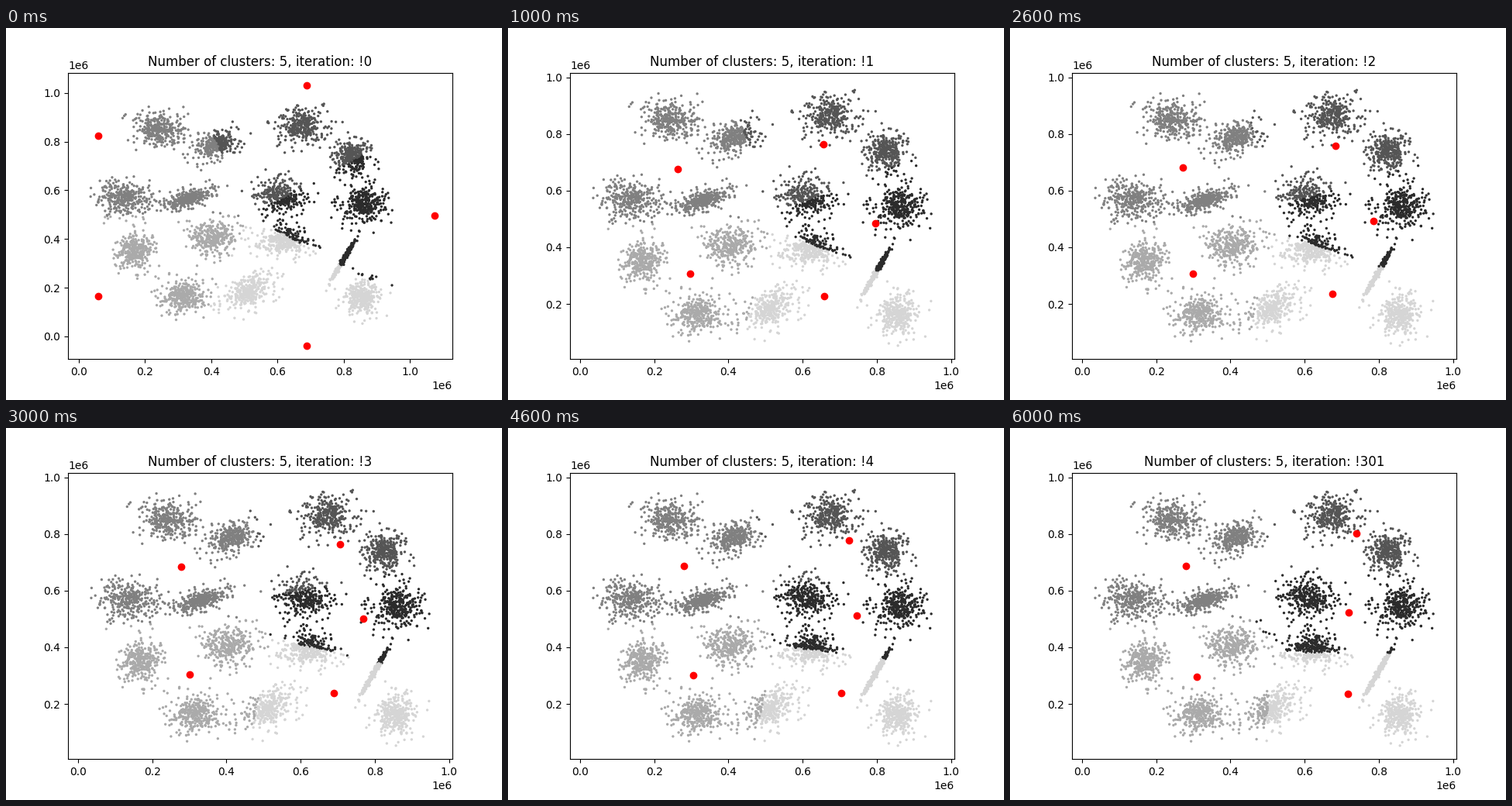
A matplotlib script for the animation above (7 s loop, 640x480 px).

```python
import numpy as np
import matplotlib.pyplot as plt
from matplotlib.animation import FuncAnimation

K = 5
rng = np.random.default_rng(4)

# Data range, and the ring of starting centres
X_RANGE = (19835.0, 961951.0)
Y_RANGE = (51121.0, 970756.0)
START_MID, START_RADIUS = np.array([513500.0, 495000.0]), 562300.0


def padded(low, high):
    pad = 0.05 * (high - low)
    return low - pad, high + pad


def to_data(pixels):
    """Stage pixels (y down) to data units in the close view."""
    p = np.asarray(pixels, float)
    x0, x1 = padded(*X_RANGE)
    y0, y1 = padded(*Y_RANGE)
    x = x0 + (p[..., 0] - 80) / 496 * (x1 - x0)
    y = y0 + (427.2 - p[..., 1]) / 369.6 * (y1 - y0)
    return np.stack([x, y], axis=-1)


def blob(cx, cy, sx=15, sy=11.5, tilt=0, count=325, df=6, reach=4):
    """Cloud with a dense core and long thin tails (Student t)."""
    z = rng.normal(size=(2 * count, 2))
    z /= np.sqrt(rng.chisquare(df, size=(2 * count, 1)) / df)
    z = z[np.hypot(z[:, 0], z[:, 1]) < reach][:count]
    u, v = z[:, 0], tilt * z[:, 0] + np.sqrt(1 - tilt ** 2) * z[:, 1]
    return np.column_stack([cx + sx * u, cy - sy * v])


def scatter_points():
    pixels = np.vstack([
        # round
        blob(210, 119), blob(415, 113), blob(383, 219), blob(285, 281),
        blob(246, 369), blob(505, 230), blob(173, 301, 12),
        blob(487, 160, 12), blob(502, 370, 12),
        # wide
        blob(159, 222, 18), blob(389, 285, 16, 9.5),
        # leaning
        blob(293, 141, 14, 10, 0.4), blob(338, 362, 14, 11, 0.4),
        blob(253, 222, 15, 7, 0.6), blob(477, 312, 7.5, 13, 0.985),
    ])
    p = to_data(pixels)
    low, high = np.transpose([X_RANGE, Y_RANGE])
    return p[((p >= low) & (p <= high)).all(axis=1)]


# Where each centre is after the first update, halfway and at rest
FIRST, HALF, REST = to_data([
    [(474, 252), (407, 150), (219, 182), (235, 317), (408, 346)],
    [(461, 246), (431, 150), (226, 179), (237, 318), (423, 342)],
    [(437, 238), (447, 136), (227, 178), (241, 321), (436, 343)],
])


def centres_at(step):
    if step == 0:
        a = 2 * np.pi * np.arange(K) / K
        return START_MID + START_RADIUS * np.column_stack(
            [np.cos(a), np.sin(a)])
    # parabola through the three poses
    t = min((step - 1) / 4, 1)
    return ((1 - t) * (1 - 2 * t) * FIRST + 4 * t * (1 - t) * HALF
            + t * (2 * t - 1) * REST)


points = scatter_points()
names = [0, 1, 2, 3, 4, 5, 301]
greys = np.repeat((np.arange(1, K + 1) / (K + 1))[:, None], 3, axis=1)

fig, ax = plt.subplots(figsize=(6.4, 4.8), dpi=100)
dots = ax.scatter(points[:, 0], points[:, 1], s=2, c="0.5")
marks, = ax.plot([], [], "o", color="red")


def draw(step):
    centres = centres_at(step)
    gaps = np.linalg.norm(points[:, None] - centres[None], axis=2)
    dots.set_color(greys[gaps.argmin(axis=1)])
    marks.set_data(centres[:, 0], centres[:, 1])
    (cx0, cy0), (cx1, cy1) = centres.min(axis=0), centres.max(axis=0)
    ax.set_xlim(padded(min(X_RANGE[0], cx0), max(X_RANGE[1], cx1)))
    ax.set_ylim(padded(min(Y_RANGE[0], cy0), max(Y_RANGE[1], cy1)))
    ax.set_title(f"Number of clusters: {K}, iteration: !{names[step]}")
    return dots, marks


anim = FuncAnimation(fig, draw, frames=len(names), interval=1000,
                     repeat=True, repeat_delay=0)
plt.show()
```
